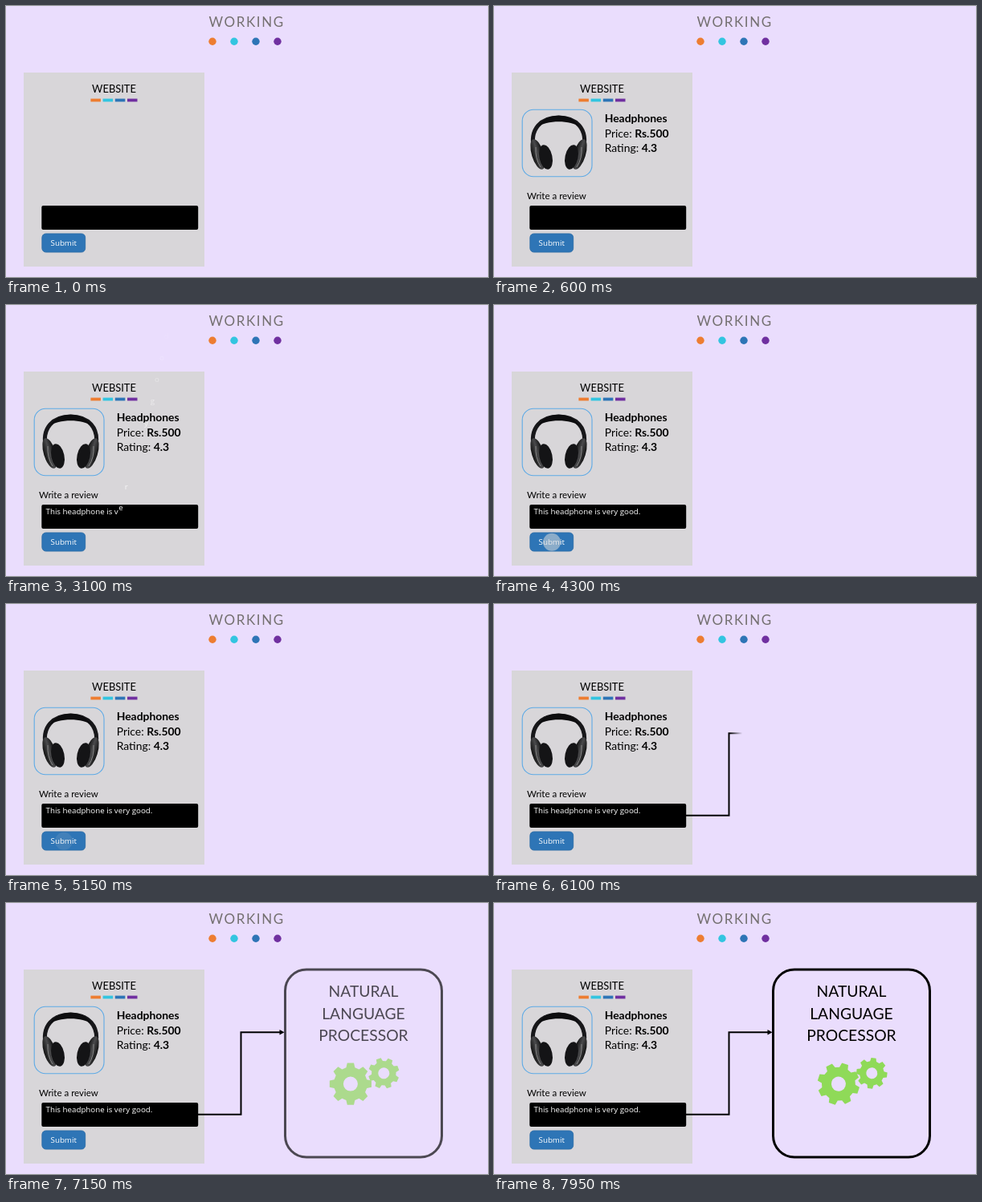
These frames come from a looping animation (600x338 px, 8000 ms). An HTML page:

```html
<!DOCTYPE html>
<html lang="en">
<head>
<meta charset="utf-8">
<title>Working</title>
<style>
  html, body { margin: 0; width: 100%; height: 100%; overflow: hidden; background: #eaddfd; }
  svg { display: block; width: 100vw; height: 100vh; }
  text { font-family: Lato, "Open Sans", sans-serif; white-space: pre; }
  .mid { text-anchor: middle; }
  .small { font-family: "Open Sans", "Noto Sans", sans-serif; font-size: 9.75px; fill: #fff; }
  .info { font-size: 13.9px; }
  .info .b { font-weight: 700; }
  .big { font-size: 19.3px; text-anchor: middle; }
</style>
</head>
<body>
<svg viewBox="0 0 600 338">
  <defs>
    <linearGradient id="edge" gradientUnits="userSpaceOnUse" x1="0" x2="16" y1="0" y2="0">
      <stop offset="0" stop-color="#fff"/>
      <stop offset="1" stop-color="#fff" stop-opacity="0"/>
    </linearGradient>
    <mask id="wipe" maskUnits="userSpaceOnUse" x="230" y="140" width="130" height="140">
      <rect x="230" y="140" width="130" height="140" fill="url(#edge)"/>
    </mask>
    <linearGradient id="cup" x1="0" x2="1" y1="0" y2="0">
      <stop offset="0" stop-color="#111"/>
      <stop offset=".5" stop-color="#4a4a4c"/>
      <stop offset="1" stop-color="#0c0c0c"/>
    </linearGradient>
  </defs>

  <rect width="600" height="338" fill="#eaddfd"/>
  <text x="252.5" y="25.8" font-size="17" letter-spacing="1.6" fill="#747070">WORKING</text>
  <g id="dots"></g>

  <rect x="22" y="83" width="225" height="242" fill="#d8d6d9"/>
  <text class="mid" x="134.5" y="108.2" font-size="12.9">WEBSITE</text>
  <g id="bars"></g>
  <rect x="44.3" y="249" width="194.9" height="30" rx="2"/>
  <rect x="44.8" y="283.9" width="53.9" height="23.2" rx="5" fill="#2e75b6" stroke="#2a6aa5" stroke-width=".8"/>
  <text class="mid small" x="71.7" y="299.3">Submit</text>

  <g id="product">
    <rect x="35.2" y="129.3" width="86.8" height="83.4" rx="14" fill="none" stroke="#5eaae6" stroke-width="1.1"/>
    <path d="M50 180C43 152 60 139 80.5 139S118 152 111 180" fill="none" stroke="#17171a" stroke-width="5"/>
    <path d="M54 151C65 132 96 132 107 151C96 142 65 142 54 151Z" fill="#0d0d0f"/>
    <g id="cupL">
      <ellipse cx="54.5" cy="185" rx="7.5" ry="19.5" fill="url(#cup)" transform="rotate(-17 54.5 185)"/>
      <ellipse cx="64.5" cy="188.5" rx="8" ry="15.5" fill="#141416" transform="rotate(-12 64.5 188.5)"/>
      <path d="M52 176Q51 190 58 201" fill="none" stroke="#888" stroke-width="1"/>
    </g>
    <use href="#cupL" transform="matrix(-1 0 0 1 161 0)"/>
    <text class="info" x="137.7" y="145.3"><tspan class="b">Headphones</tspan></text>
    <text class="info" x="137.7" y="163.6">Price: <tspan class="b">Rs.500</tspan></text>
    <text class="info" x="137.7" y="181.9">Rating: <tspan class="b">4.3</tspan></text>
    <text x="41" y="241" font-size="11.5">Write a review</text>
  </g>

  <text id="ruler" class="small" x="49.5" y="261" visibility="hidden">This headphone is very good.</text>
  <g id="letters"></g>
  <circle id="tap" cx="72" cy="295.8" r="11" fill="#d9d9d9"/>

  <g mask="url(#wipe)">
    <path d="M239 263.8H292.5V161.3H342" fill="none" stroke="#000" stroke-width="2"/>
    <path d="M346.5 161.3L340.5 158.1V164.5Z"/>
  </g>

  <g id="processor">
    <rect x="347.5" y="83" width="195" height="234" rx="26.5" fill="none" stroke="#000" stroke-width="3"/>
    <text class="big" x="445" y="117.4">NATURAL</text>
    <text class="big" x="445" y="144.6">LANGUAGE</text>
    <text class="big" x="445" y="171.8">PROCESSOR</text>
    <path id="gearA" fill="#8fda58" fill-rule="evenodd"/>
    <path id="gearB" fill="#8fda58" fill-rule="evenodd"/>
  </g>
</svg>
<script>
const LOOP = 8000;
const FIRST_REST = 1520, STEP = 100, FLIGHT = 660;
const COLORS = ['#ed7d31', '#33c5e0', '#2e75b6', '#7030a0'];

const $ = id => document.getElementById(id);
const clamp = v => Math.max(0, Math.min(1, v));
const ramp = (t, a, b) => clamp((t - a) / (b - a));
const mix = (a, b, p) => a + (b - a) * p;

function add(parent, tag, attrs) {
  const el = document.createElementNS('http://www.w3.org/2000/svg', tag);
  for (const k in attrs) el.setAttribute(k, attrs[k]);
  return parent.appendChild(el);
}

COLORS.forEach((fill, i) => {
  add($('dots'), 'circle', { cx: 257 + 27 * i, cy: 44.2, r: 4.7, fill });
  add($('bars'), 'rect', { x: 105.4 + 15.2 * i, y: 115.6, width: 12.5, height: 3.8, fill });
});

function gear(outer, body, hole) {
  const pts = [];
  for (let i = 0; i < 8; i++) {
    [[-15, body], [-9, outer], [9, outer], [15, body]].forEach(([deg, r]) => {
      const a = (i * 45 + deg) * Math.PI / 180;
      pts.push((r * Math.cos(a)).toFixed(2) + ' ' + (r * Math.sin(a)).toFixed(2));
    });
  }
  return `M${pts.join('L')}ZM${hole} 0A${hole} ${hole} 0 1 0 ${-hole} 0A${hole} ${hole} 0 1 0 ${hole} 0Z`;
}
$('gearA').setAttribute('d', gear(26.4, 21, 9));
$('gearB').setAttribute('d', gear(19.4, 15.3, 7));

// Spaces take no time; each visible letter rests one step after the last.
const ruler = $('ruler');
const letters = [];
[...ruler.textContent].forEach((ch, i) => {
  if (ch === ' ') return;
  const el = add($('letters'), 'text', { class: 'small' });
  el.textContent = ch;
  letters.push({ el, x: ruler.getStartPositionOfChar(i).x, rest: FIRST_REST + letters.length * STEP });
});

// Offset from the resting place, s ms before landing: drift, swoop, settle.
function offset(s) {
  if (s <= 0) return [0, 0];
  if (s < 120) return [2.5 * s / 120, 31 * s / 120];
  if (s < 220) return [mix(2.5, 23, (s - 120) / 100), mix(31, 111, (s - 120) / 100)];
  return [23, 111 + 0.27 * (s - 220)];
}

function draw(t) {
  $('product').setAttribute('opacity', ramp(t, 30, 590));

  for (const { el, x, rest } of letters) {
    const s = rest - t;
    const [dx, up] = offset(s);
    el.setAttribute('opacity', 1 - ramp(s, 0, FLIGHT));
    el.setAttribute('x', x + dx);
    el.setAttribute('y', 261 - up);
  }

  $('tap').setAttribute('opacity', 0.55 * ramp(t, 4000, 4300) * (1 - ramp(t, 4980, 5200)));

  const front = mix(239, 362, ramp(t, 5200, 6780));
  $('edge').setAttribute('gradientTransform', `translate(${front - 16} 0)`);

  $('processor').setAttribute('opacity', ramp(t, 6800, 7320));
  const spin = Math.max(0, t - 7830) * 0.15;
  $('gearA').setAttribute('transform', `translate(428.9 225.6) rotate(${spin})`);
  $('gearB').setAttribute('transform', `translate(470.3 212.3) rotate(${25 - spin})`);
}

const start = performance.now();
function tick() {
  draw((performance.now() - start) % LOOP);
  requestAnimationFrame(tick);
}
tick();
</script>
</body>
</html>
```
